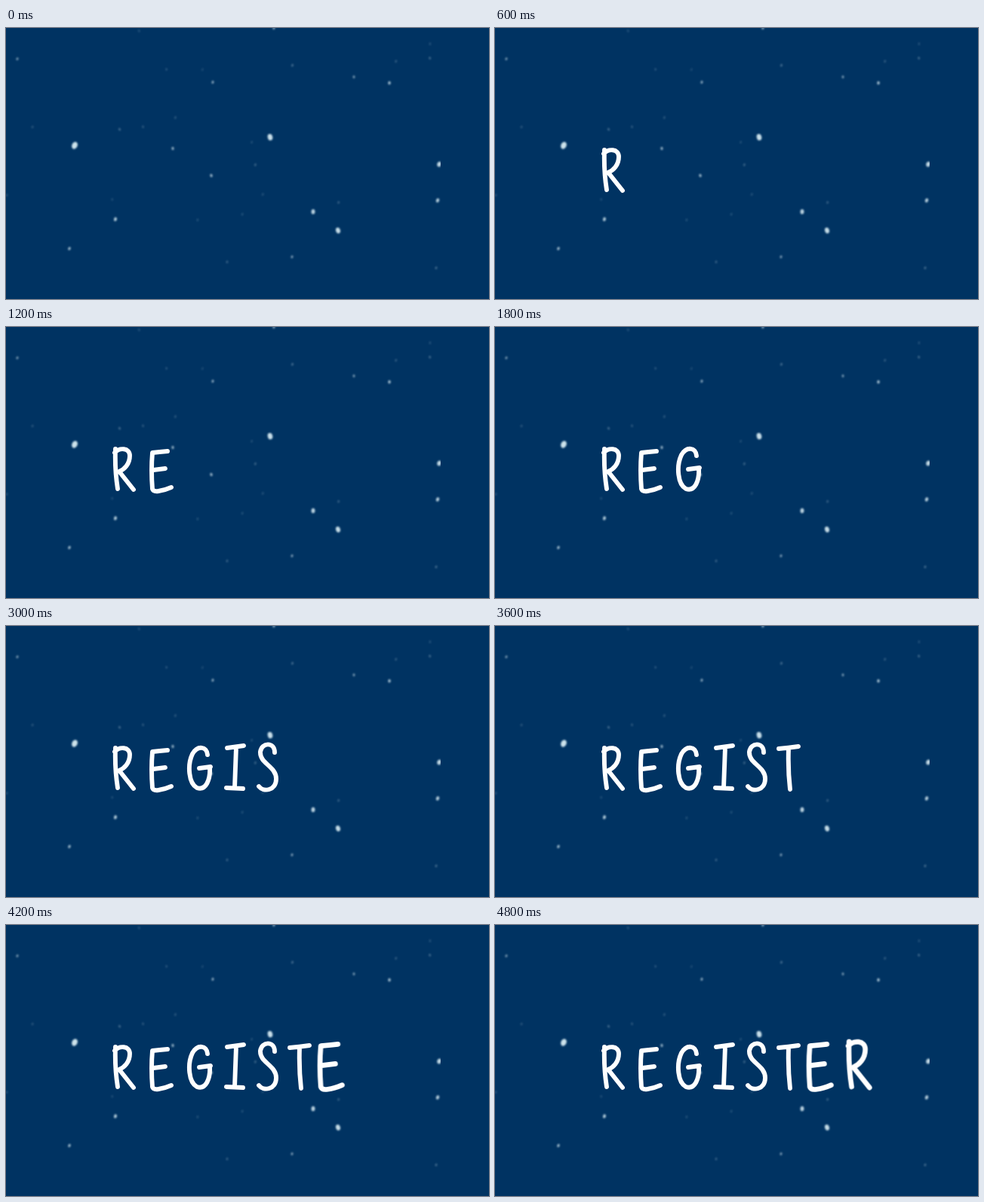
An HTML page for the animation above (6 s loop, 640 by 360 pixels).

```html
<!DOCTYPE html>
<html lang="en">
<head>
<meta charset="utf-8">
<title>Register</title>
<style>
  html, body { margin: 0; width: 100%; height: 100%; overflow: hidden; background: #003362; }
  svg { display: block; width: 640px; height: 360px; }
  .word path { fill: none; stroke: #fff; stroke-width: 5.9; stroke-linecap: round; stroke-linejoin: round; opacity: 0; }
</style>
</head>
<body>
<svg viewBox="0 0 640 360" role="img" aria-label="REGISTER">
  <defs>
    <filter id="soft" filterUnits="userSpaceOnUse" width="640" height="360">
      <feGaussianBlur stdDeviation=".9"/>
    </filter>
  </defs>
  <rect width="640" height="360" fill="#003362"/>
  <g class="snow" fill="#d3e8f0" filter="url(#soft)"></g>
  <g class="word"></g>
</svg>
<script>
const LOOP = 6000, STEP = 600, BASELINE = 216;
const WORD = "REGISTER";
const LEFT = [144, 193, 243, 291, 335, 375, 416, 468];

// Pen strokes, with the origin at the left end of the baseline
const GLYPHS = {
  R: "M1 -54Q0 -26 4 -1M0 -49C6 -56 20 -56 20 -45C20 -34 13 -27 6 -24L25 0",
  E: "M21 -51Q10 -50 1 -49Q-1 -26 1 -1Q2 3 9 2Q17 1 26 -3M2 -26L18 -28",
  G: "M24 -45C23 -56 11 -58 4 -46C-3 -31 -1 -7 10 -1C22 3 28 -12 27 -28M13 -27L28 -29",
  I: "M2 -54L24 -57M14 -55L12 -1M1 -1L23 0",
  S: "M21 -48C21 -62 4 -62 2 -49C1 -33 23 -30 23 -13C23 3 6 5 0 -3",
  T: "M1 -53Q13 -54 27 -56M14 -53Q13 -25 16 1"
};

// The clearest flakes, from largest to smallest
const FLAKES = [
  [441, 358], [91, 156], [350, 145], [440, 269], [574, 181], [407, 244], [234, 343],
  [572, 229], [145, 254], [615, 94], [590, 310], [508, 73], [84, 293], [272, 196],
  [221, 160], [355, 0], [274, 72], [619, 338], [379, 304], [461, 65], [15, 41]
];
const SPECKS = 24;

let seed = 7;
function random() {
  seed = (seed * 16807) % 2147483647;
  return seed / 2147483647;
}

function add(parent, tag, attrs) {
  const el = document.createElementNS("http://www.w3.org/2000/svg", tag);
  for (const key in attrs) el.setAttribute(key, attrs[key]);
  return parent.appendChild(el);
}

const snow = document.querySelector(".snow");
const word = document.querySelector(".word");

function addFlake(x, y, size, opacity) {
  const tilt = 60 * random() - 30;
  add(snow, "ellipse", {
    rx: size * 0.75, ry: size, opacity,
    transform: `translate(${x} ${y}) rotate(${tilt})`
  });
}

FLAKES.forEach(([x, y], i) => addFlake(x, y, 2 + 3.5 * Math.exp(-i / 5), 1 - i * 0.025));
for (let i = 0; i < SPECKS; i++) {
  addFlake(640 * random(), 360 * random(), 2, 0.1 + 0.2 * random());
}

[...WORD].forEach((char, i) => {
  const scale = i < 6 ? 1 : 1.13; // the last two letters are larger
  const letter = add(word, "path", {
    d: GLYPHS[char],
    transform: `translate(${LEFT[i]} ${BASELINE}) scale(${scale})`
  });
  const offset = (i + 1) * STEP / LOOP;
  const reveal = letter.animate(
    [{ opacity: 0 }, { opacity: 0, offset }, { opacity: 1, offset }, { opacity: 1 }],
    { duration: LOOP, iterations: Infinity }
  );
  reveal.startTime = 0;
});
</script>
</body>
</html>
```
